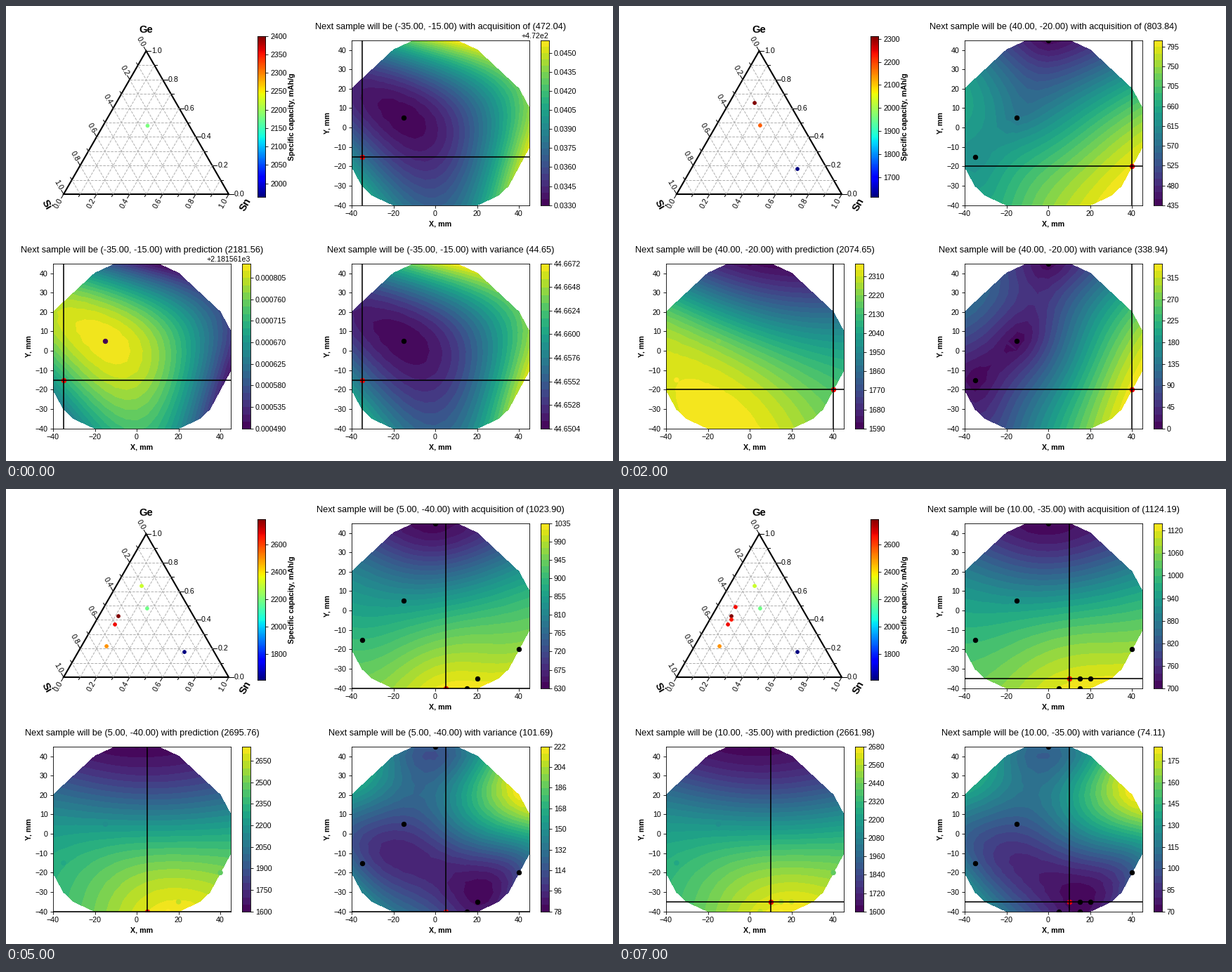
Recreate the animation shown at these times as a matplotlib script. Size 864 by 648 pixels, loop 8000 ms.

```python
import numpy as np
import matplotlib.pyplot as plt
from matplotlib.animation import FuncAnimation
from matplotlib.patches import Rectangle

W, H = 864, 648
K = 1.0625  # scale of fonts and strokes
plt.rcParams.update({
    "font.family": "Liberation Sans", "font.size": 10 * K,
    "axes.titlesize": 12 * K, "axes.labelsize": 10 * K,
    "axes.labelweight": "bold", "axes.labelpad": 4 * K,
    "axes.linewidth": 0.8 * K, "figure.facecolor": "white",
})
for axis in ("xtick", "ytick"):
    plt.rcParams.update({f"{axis}.major.size": 3.5 * K,
                         f"{axis}.major.pad": 3.5 * K,
                         f"{axis}.major.width": 0.8 * K})

fig = plt.figure(figsize=(W / 72, H / 72), dpi=72)

# ---- samples in the order they are taken ----------------------------------
PLACES = np.array([(-15, 5), (-35, -15), (0, 45), (40, -20), (15, -40),
                   (20, -35), (5, -40), (15, -35), (10, -35)])
CAPACITY = np.array([2181.56, 2312.6, 1615, 2499, 2783, 2668, 2660, 2650])
GE_SN = [(.48, .266), (.637, .154), (.176, .644), (.216, .152),
         (.426, .119), (.368, .127), (.49, .112), (.402, .131)]

# acquisition, prediction and variance expected at the next sample
NEXT = [(472.04, 2181.56, 44.65), (613.98, 2245.37, 113.00),
        (803.84, 2074.65, 338.94), (792.23, 2457.35, 82.55),
        (952.24, 2705.62, 96.37), (1023.90, 2695.76, 101.69),
        (1071.93, 2692.40, 74.52), (1124.19, 2661.98, 74.11)]

# colour ranges of the same three maps
RANGES = [((.033, .046), (.00049, .000835), (44.6504, 44.6672)),
          ((.07575, .08175), (.0648, .0717), (-.0076, .0016)),
          ((435, 810), (1590, 2370), (0, 345)),
          ((480, 795), (1600, 2520), (4, 96)),
          ((570, 960), (1600, 2750), (40, 160)),
          ((630, 1035), (1600, 2750), (78, 222)),
          ((660, 1065), (1600, 2680), (78, 216)),
          ((700, 1140), (1600, 2680), (70, 185))]
OFFSETS = {0: ("+4.72e2", "+2.181561e3", ""),
           1: ("+6.139e2", "+2.2453e3", "+1.13e2")}


# ---- wafer ----------------------------------------------------------------
def wafer_grid():
    """5 mm grid on a round wafer whose left and bottom are cut at -40."""
    gx, gy = np.meshgrid(np.arange(-40, 46, 5), np.arange(-40, 46, 5))
    ax, ay = abs(gx), abs(gy)
    keep = (ax + ay <= 60) | (ax + ay <= 65) & (gy < 0)
    keep &= (ax + 2 * ay <= 100) | (gy < 0)
    keep &= (ax + 3 * ay <= 140) | (gy > 0)
    keep &= (2 * ax + ay <= 100)
    return np.column_stack([gx[keep], gy[keep]])


def composition(p):
    """Ge, Si and Sn fractions: log ratios change linearly over the wafer."""
    x, y = p.T
    parts = np.exp([0 * x, -.18 + .0305 * x + .005 * y,
                    -.32 + .019 * x + .034 * y])
    return (parts / parts.sum(0)).T


GRID = wafer_grid()


def unit(z):
    return .01 + .98 * (z - z.min()) / np.ptp(z)


def gauss_process(n):
    """Prediction and deviation on the grid after n + 1 samples."""
    length, noise = (3, 1) if n < 2 else (.45, 5e-4) if n < 4 else (.45, .03)
    known, grid = composition(PLACES[:n + 1]), composition(GRID)

    def kernel(a, b):
        d2 = ((a[:, None] - b[None]) ** 2).sum(-1)
        return np.exp(-d2 / (2 * length ** 2))

    inv = np.linalg.inv(kernel(known, known) + noise * np.eye(n + 1))
    k = kernel(grid, known)
    y = CAPACITY[:n + 1]
    mean = k @ inv @ (y - y.mean() + 1)
    dev = np.sqrt(1 - ((k @ inv) * k).sum(1))
    return unit(mean), unit(dev)


# ---- scales ---------------------------------------------------------------
def nice_step(span, limit, digits):
    """Smallest round step that cuts the span into fewer parts than limit."""
    for power in range(-6, 4):
        for d in digits:
            step = d * 10.0 ** power
            if np.ceil(span / step - 1e-6) < limit:
                return step


def level_scale(low, high):
    step = nice_step(high - low, 28, (1, 1.5, 2, 2.5, 3, 4, 5, 6, 8))
    bands = round((high - low) / step)
    places = next(d for d in range(8)
                  if abs(round(3 * step, d) - 3 * step) < 1e-9)
    ticks = range(0, bands + 1, 3)
    labels = [f"{low + k * step:.{places}f}".replace("-", "\u2212")
              for k in ticks]
    return bands, ticks, labels


# ---- drawing --------------------------------------------------------------
def box(x0, y0, x1, y1):
    return fig.add_axes([x0 / W, 1 - (y1 - .3) / H,
                         (x1 - x0) / W, (y1 - y0) / H])


def strip(ax, column, low, high, cmap):
    ax.imshow(column[:, None], cmap=cmap, origin="lower", aspect="auto",
              extent=(0, 1, low, high), vmin=0, vmax=1,
              interpolation="nearest")
    ax.set_xticks([])
    ax.yaxis.tick_right()


def panel(x, y, z, limits, offset, title, n, colored=False):
    ax = box(x, y, x + 253, y + 235)
    bands, ticks, labels = level_scale(*limits)
    ax.tricontourf(GRID[:, 0], GRID[:, 1], z * bands,
                   levels=np.arange(bands + 1), cmap="viridis")
    done, (nx, ny) = PLACES[:n + 1], PLACES[n + 1]
    caps = CAPACITY[:n + 1]
    look = {"c": "k"}
    if colored:
        look = {"c": caps, "cmap": "viridis", "vmin": caps.min(),
                "vmax": max(caps.max(), caps.min() + 1)}
    ax.scatter(done[:, 0], done[:, 1], s=36 * K * K, **look)
    ax.scatter([nx], [ny], s=36 * K * K, c="red")
    ax.axvline(nx, color="k", lw=1.5 * K)
    ax.axhline(ny, color="k", lw=1.5 * K)
    ax.set(xlim=(-40, 45), ylim=(-40, 45), xlabel="X, mm", ylabel="Y, mm",
           xticks=range(-40, 41, 20), yticks=range(-40, 41, 10))
    ax.set_title(title, pad=16)

    bar = box(x + 268.8, y, x + 280.5, y + 235)
    strip(bar, (np.arange(bands) + .5) / bands, 0, bands, "viridis")
    bar.set_yticks(ticks, labels)
    bar.set_ylim(0, bands)
    fig.text((x + 280.5) / W, 1 - (y - 3.2) / H, offset,
             ha="right", va="baseline")


def corner(ge, sn):
    return np.array([82 + 235 * (sn + ge / 2), 268 - 204 * ge])


def ternary(n):
    ax = fig.add_axes([0, 0, 1, 1], zorder=-1)
    ax.set(xlim=(0, W), ylim=(H, 0))
    ax.axis("off")

    def line(p, q, **style):
        ax.plot([p[0], q[0]], [p[1], q[1]], **style)

    s = 3 ** .5 / 2
    for k in range(11):
        f = k / 10
        if 0 < k < 10:
            for p, q in (((f, 0), (f, 1 - f)), ((0, f), (1 - f, f)),
                         ((0, 1 - f), (1 - f, 0))):
                line(corner(*p), corner(*q), color="#b0b0b0", ls="--", lw=1)
        for base, way, turn in ((corner(f, 1 - f), (1, 0), 0),
                                (corner(0, f), (-.5, s), 60),
                                (corner(1 - f, 0), (-.5, -s), -60)):
            way = np.array(way)
            line(base, base + way * (4 if k % 2 else 6.5), color="k", lw=1)
            if k % 2 == 0:
                tx, ty = base + way * 15
                ax.text(tx, ty, f"{f:.1f}", rotation=turn,
                        ha="center", va="center")
    edge = np.array([corner(1, 0), corner(0, 0), corner(0, 1)])
    ax.fill(edge[:, 0], edge[:, 1], fill=False, ec="k", lw=2 * K)
    for name, tx, ty, turn in (("Ge", 199, 34, 0), ("Si", 58, 283, -60),
                               ("Sn", 341, 283, 60)):
        ax.text(tx, ty, name, size=14 * K, weight="bold", rotation=turn,
                ha="center", va="center")

    caps = CAPACITY[:n + 1]
    low, high = caps.min(), caps.max()
    if n == 0:
        low, high = low * .9, high * 1.1
    spots = np.array([corner(*m) for m in GE_SN[:n + 1]])
    ax.scatter(spots[:, 0], spots[:, 1], c=caps, cmap="jet", vmin=low,
               vmax=high, s=22, zorder=5)

    bar = box(357.7, 43, 369.2, 272)
    strip(bar, np.linspace(0, 1, 256), low, high, "jet")
    step = nice_step(high - low, 10, (1, 2, 5))
    bar.set_yticks(np.arange(np.ceil(low / step) * step, high + .5, step))
    fig.text(407 / W, 1 - 157.5 / H, "Specific capacity, mAh/g", rotation=90,
             weight="bold", ha="center", va="center")


def draw(n):
    fig.clear()
    ternary(n)
    pred, dev = gauss_process(n)
    acq_next, pred_next, dev_next = NEXT[n]
    acq_range, pred_range, dev_range = RANGES[n]

    # acquisition is a weighted sum that leans to prediction step by step
    lean = (acq_next - dev_next) / (pred_next - dev_next)
    acq = unit(lean * np.ptp(pred_range) * pred
               + (1 - lean) * np.ptp(dev_range) * dev)

    x, y = PLACES[n + 1]
    head = f"Next sample will be ({x:.2f}, {y:.2f}) with"
    notes = OFFSETS.get(n, ("", "", ""))
    panel(492, 49, acq, acq_range, notes[0],
          f"{head} acquisition of ({acq_next:.2f})", n)
    panel(67, 367, pred, pred_range, notes[1],
          f"{head} prediction ({pred_next:.2f})", n, colored=True)
    panel(492, 367, dev, dev_range, notes[2],
          f"{head} variance ({dev_next:.2f})", n)
    # long titles are cut at the panel's left border
    fig.add_artist(Rectangle((432 / W, 600 / H), 8 / W, 48 / H, fc="white",
                             ec="none", transform=fig.transFigure, zorder=10))
    return []


anim = FuncAnimation(fig, draw, frames=8, interval=1000, repeat=True,
                     repeat_delay=0, blit=False)
plt.show()
```
